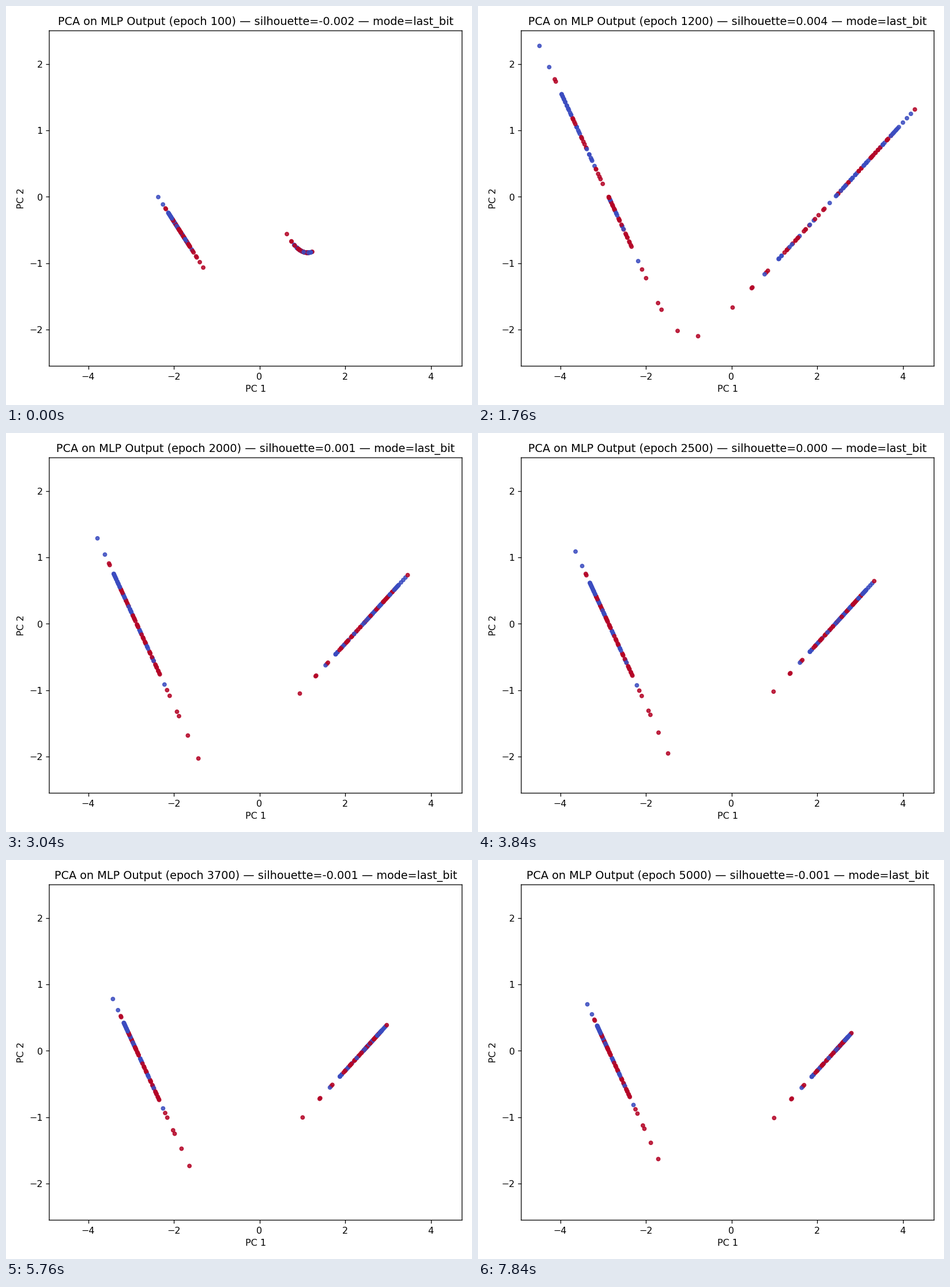
A matplotlib script that plays this animation: 808 by 693 pixels, repeating every 8 s.

```python
import numpy as np
import matplotlib.pyplot as plt
from matplotlib.animation import FuncAnimation

W, H, DPI = 808, 693, 115.5
FRAMES, INTERVAL = 50, 160

# Stage pixel of the data origin, pixels per data unit, and the axes box
OX, OY, SX, SY = 439.5, 331.5, 74.25, 115.4
X0, X1, Y0, Y1 = 75, 790.7, 43, 625.5

BLUE, RED = plt.cm.coolwarm(0.0), plt.cm.coolwarm(1.0)
rng = np.random.default_rng(4)

# frame, reach of left arm (outer, inner), of right arm (inner, outer), warp, floor
POSES = [
    (0, 38, 40, 28, 16, 1, np.inf),
    (5, 64, 93, 144, 27, 1.4, 470),
    (11, 120, 155, 178, 138, 1.6, 574),
    (14, 99, 122, 141, 108, 1.4, np.inf),
    (19, 68, 107, 110, 77, 1.15, np.inf),
    (29, 47, 99, 104, 58, 1, np.inf),
    (49, 37, 86, 106, 28, 1, np.inf),
]
KEYS = [p[0] for p in POSES]

SCORES = {100: -0.002, 600: -0.0008, 1200: 0.004, 2000: 0.001,
          3000: -0.0003, 3700: -0.001, 5000: -0.001}


def make_arm(strays, lo, hi, n, edges):
    """Places along an arm (-1 to 1) and colours, which alternate at the edges."""
    step = (hi - lo) / n
    dense = np.linspace(lo, hi, n) + rng.uniform(-step, step, n)
    v = np.concatenate([strays, dense])
    fuzz = np.concatenate([np.zeros(len(strays)), rng.normal(0, 0.012, n)])
    blue = np.searchsorted(edges, v + fuzz) % 2 == 1
    return v, [BLUE if b else RED for b in blue]


def stretch(v, low, high, low_pow, high_pow):
    """Scale the two halves of an arm separately about its pivot."""
    a = np.abs(v)
    return np.where(v < 0, -low * a**low_pow, high * a**high_pow)


def soft_floor(y, floor, width=25):
    return -width * np.logaddexp(-y / width, -floor / width)


def pose(frame, l_out, l_in, r_in, r_out, warp, floor):
    """Stage positions of all dots in one pose."""
    dl = stretch(left, l_out, l_in, 1 / warp, warp)
    dr = stretch(right, r_in, r_out, 1 / warp, 1)
    if frame == 0:
        lx, rx = 302 + dl, 515 + dr
        ly, ry = 391.5 + 1.57 * dl, 428.5 - 0.025 * (rx - 523) ** 2
    else:
        lx, rx = 226.6 + dl, 619.5 + dr
        ly, ry = (soft_floor(OY + s * d, floor) for s, d in ((2.185, dl), (-1.1, dr)))
    x, y = np.append(lx, rx), np.append(ly, ry)
    return np.column_stack([(x - OX) / SX, (OY - y) / SY])


left, left_c = make_arm(
    [-1, -0.785, -0.67, -0.65, 0.5, 0.54, 0.58, 0.69, 0.72, 0.85, 1], -0.55, 0.43, 85,
    [-1.1, -0.7, -0.6, -0.35, -0.29, -0.23, -0.15, -0.08, 0.06, 0.09,
     0.185, 0.24, 0.295, 0.325, 0.48, 0.52])
right, right_c = make_arm(
    [-1, -0.72, -0.71, -0.55, -0.53, -0.51, 0.85, 0.9, 0.95, 1], -0.4, 0.8, 85,
    [-0.56, -0.54, -0.41, -0.33, -0.27, -0.245, -0.205, -0.17, -0.11, -0.07,
     -0.01, 0.035, 0.07, 0.13, 0.2, 0.27, 0.335, 0.43, 0.57, 0.62, 0.7, 0.98])

order = rng.permutation(len(left) + len(right))
poses = [pose(*p)[order] for p in POSES]
colors = np.array(left_c + right_c)[order]

plt.rcParams["font.family"] = "DejaVu Sans"
fig = plt.figure(figsize=((W + 0.01) / DPI, (H + 0.01) / DPI), dpi=DPI)
ax = fig.add_axes([X0 / W, 1 - Y1 / H, (X1 - X0) / W, (Y1 - Y0) / H])
ax.set_xlim((X0 - OX) / SX, (X1 - OX) / SX)
ax.set_ylim((OY - Y1) / SY, (OY - Y0) / SY)
ax.set_xticks(range(-4, 5, 2))
ax.set_yticks(range(-2, 3))
ax.set_xlabel("PC 1")
ax.set_ylabel("PC 2")
for line in [*ax.spines.values(), *ax.get_xticklines(), *ax.get_yticklines()]:
    line.set_snap(False)
title = ax.set_title("")
dots = ax.scatter(*poses[0].T, s=15, c=colors, alpha=0.85)


def update(i):
    k = min(int(np.searchsorted(KEYS, i, side="right")) - 1, len(KEYS) - 2)
    f = (i - KEYS[k]) / (KEYS[k + 1] - KEYS[k])
    if k == len(KEYS) - 2:
        f = 1 - (1 - f) ** 2  # settle slowly at the end
    dots.set_offsets((1 - f) * poses[k] + f * poses[k + 1])
    epoch = 100 * (i + 1)
    score = np.interp(epoch, list(SCORES), list(SCORES.values()))
    title.set_text(f"PCA on MLP Output (epoch {epoch}) — "
                   f"silhouette={score:.3f} — mode=last_bit")
    return dots, title


anim = FuncAnimation(fig, update, frames=FRAMES, interval=INTERVAL,
                     repeat=True, repeat_delay=0)
plt.show()
```
